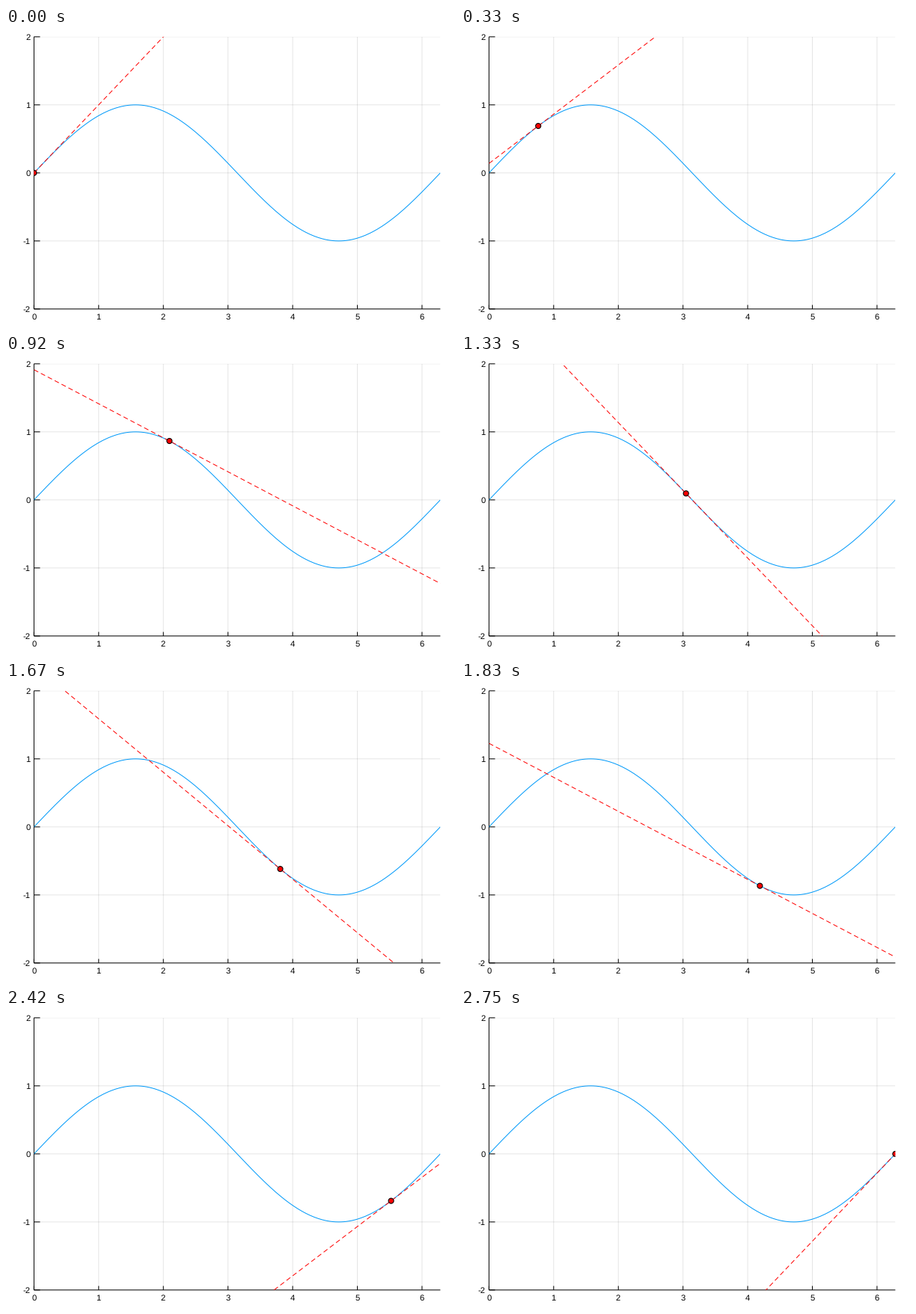
A matplotlib script for the animation above (2.83 s loop, 600 px wide and 400 px high).

```python
import numpy as np
import matplotlib.pyplot as plt
from matplotlib.animation import FuncAnimation
from matplotlib.patches import Circle, Polygon
from matplotlib.transforms import Affine2D

W, H, DPI = 600, 400, 100
PX = 72 / DPI                      # one pixel in points
LEFT, RIGHT, TOP, BOTTOM = 37.4, 580.4, 11.8, 375.9
LOOP_MS, TICK_MS, FPS = 2830, 10, 12
STEPS = 33                         # moves from 0 to 2 pi
TAU = 2 * np.pi

plt.rcParams["text.hinting"] = "no_hinting"
fig = plt.figure(figsize=(W / DPI, H / DPI), dpi=DPI, facecolor="white")
ax = fig.add_axes([0, 0, 1, 1])
ax.set(xlim=(0, W), ylim=(H, 0))
ax.axis("off")

# Stage pixels, y downwards; the plot area clips with soft edges.
stage = Affine2D().scale(1 / W, -1 / H).translate(0, 1) + fig.transFigure
frame = Polygon([(LEFT, TOP), (RIGHT, TOP), (RIGHT, BOTTOM), (LEFT, BOTTOM)],
                transform=stage)


def px_x(x):
    return LEFT + x * (RIGHT - LEFT) / TAU


def px_y(y):
    return TOP + (2 - y) * (BOTTOM - TOP) / 4


def clipped(artist):
    artist.set_clip_box(fig.bbox)
    artist.set_clip_path(frame)
    return artist


def stroke(xs, ys, color="black", **style):
    line, = ax.plot(xs, ys, color=color, lw=PX, transform=stage, snap=False,
                    solid_capstyle="butt", dash_capstyle="butt", **style)
    return line


def label(x, y, value, ha):
    ax.text(x, y, str(value), ha=ha, va="baseline", transform=stage,
            family="Liberation Sans", fontsize=11.2 * PX, color="black")


for v in range(7):
    x = px_x(v)
    clipped(stroke([x, x], [TOP, BOTTOM], alpha=0.1, zorder=1))
    stroke([x, x], [BOTTOM, BOTTOM - 5.4], zorder=2)
    label(x - 0.2, 390, v, "center")

for v in range(-2, 3):
    y = px_y(v)
    clipped(stroke([LEFT, RIGHT], [y, y], alpha=0.1, zorder=1))
    stroke([LEFT, LEFT + 8.1], [y, y], zorder=2)
    label(32.4, y + 3.7, v, "right")

stroke([LEFT, LEFT], [TOP, BOTTOM], zorder=2)
stroke([LEFT, RIGHT], [BOTTOM, BOTTOM], zorder=2)

xs = np.linspace(0, TAU, 300)
clipped(stroke(px_x(xs), px_y(np.sin(xs)), "#009AFA", zorder=3))
tangent = clipped(stroke([], [], "red", zorder=4, dashes=(6.4, 4)))
dot = Circle((0, 0), 3.5, fc="red", ec="black", lw=1.1 * PX, zorder=5,
             transform=stage, snap=False)
ax.add_patch(dot)
clipped(dot)


def draw(i):
    step = min((i * TICK_MS + 5) * FPS // 1000, STEPS)
    x = TAU * step / STEPS
    y, slope = np.sin(x), np.cos(x)
    ends = np.array([0, TAU])
    tangent.set_data(px_x(ends), px_y(y + slope * (ends - x)))
    dot.center = px_x(x), px_y(y)
    return tangent, dot


anim = FuncAnimation(fig, draw, frames=LOOP_MS // TICK_MS, interval=TICK_MS,
                     repeat=True, repeat_delay=0, blit=False)
plt.show()
```
